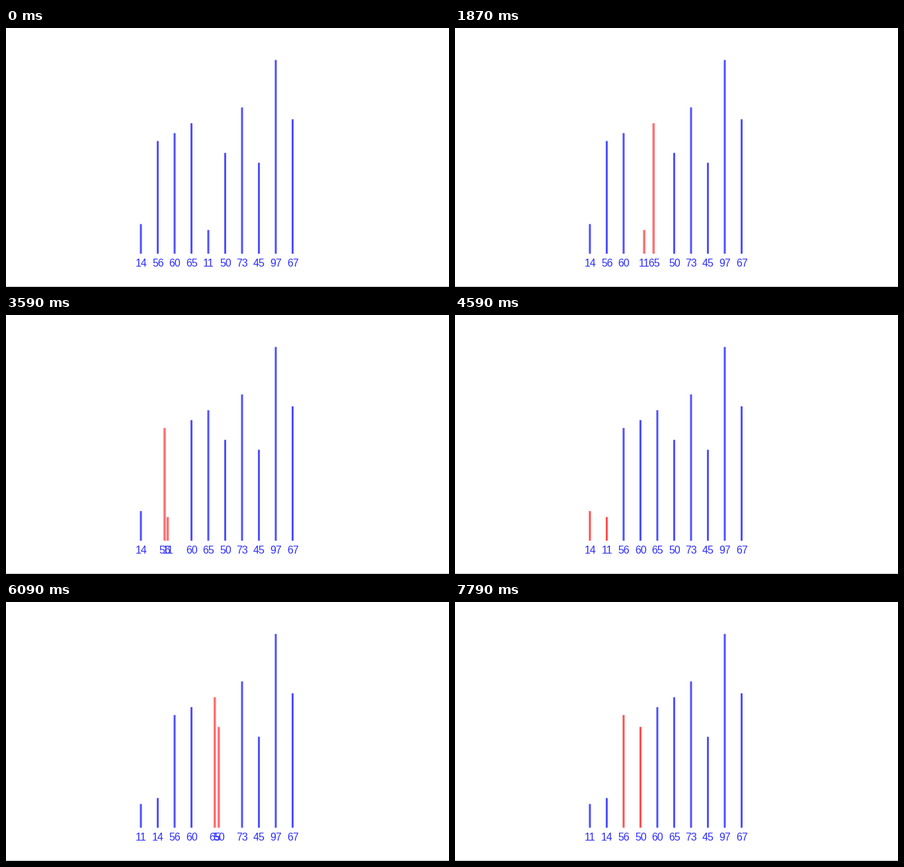
A matplotlib script for the animation above (8000 ms loop, 670 by 393 pixels).

```python
import math

import matplotlib.pyplot as plt
from matplotlib.animation import FuncAnimation
from matplotlib.patches import Rectangle

W, H, DPI = 670, 393, 100
LOOP, TICK = 8000, 20

VALUES = [14, 56, 60, 65, 11, 50, 73, 45, 97, 67]
BASE, UNIT = 341, 3
FIRST_X, GAP = 204, 25.5
STROKE = 3
BLUE, RED, MOVING, TEXT_BLUE = "#5050ff", "#ff5050", "#ff7070", "#2c2cff"

# Moments at which the sort moves on to its next comparison
MARKS = [150, 480, 930, 1250, 2020, 2800, 3900, 5220, 6550, 7790, 9030]
HOLD = 78


def comparisons(values):
    """Insertion sort: yield the bar order and left slot of each comparison."""
    order = list(range(len(values)))
    for i in range(1, len(order)):
        for j in range(i, 0, -1):
            yield order[:], j - 1
            a, b = order[j - 1], order[j]
            if values[a] <= values[b]:
                break
            order[j - 1], order[j] = b, a


STEPS = list(zip(MARKS, MARKS[1:], comparisons(VALUES)))


def swing(u):
    return 0.5 - 0.5 * math.cos(math.pi * min(max(u, 0), 1))


def state(t):
    """Return x of every bar, the compared pair and whether it is moving."""
    start, end, (order, slot) = [s for s in STEPS if s[0] <= t or s is STEPS[0]][-1]
    xs = {bar: FIRST_X + GAP * i for i, bar in enumerate(order)}
    if t < start:
        return xs, (), False
    a, b = pair = order[slot:slot + 2]
    span = end - start
    wait = 0.6 * span - 100
    moving = VALUES[a] > VALUES[b] and t - start >= wait
    if moving:
        held = wait + HOLD * ((t - start - wait) // HOLD)
        d = GAP * swing((held / span - 0.43) / 0.5)
        xs[a] += d
        xs[b] -= d
    return xs, pair, moving


fig = plt.figure(figsize=(W / DPI, H / DPI), dpi=DPI, facecolor="white")
ax = fig.add_axes([0, 0, 1, 1])
ax.set_xlim(0, W)
ax.set_ylim(H, 0)
ax.axis("off")

ax.add_patch(Rectangle((0, H - 1), W, 1, fc="#c0c0c0", lw=0))

bars, labels = [], []
for v in VALUES:
    bar = Rectangle((0, BASE - UNIT * v - STROKE / 2), STROKE,
                    UNIT * v + STROKE, lw=0, snap=False)
    bars.append(ax.add_patch(bar))
    labels.append(ax.text(0, 362, str(v), color=TEXT_BLUE, ha="center",
                          va="baseline", family="Liberation Sans",
                          size=16 * 72 / DPI))


def draw(n):
    xs, pair, moving = state(n * TICK + TICK / 2)
    for i, (bar, label) in enumerate(zip(bars, labels)):
        soft = moving and i in pair
        width = STROKE + 0.5 * soft
        bar.set_x(xs[i] - width / 2)
        bar.set_width(width)
        bar.set_facecolor(MOVING if soft else RED if i in pair else BLUE)
        label.set_x(xs[i] + 0.4)
    return bars + labels


anim = FuncAnimation(fig, draw, frames=LOOP // TICK, interval=TICK,
                     repeat=True, repeat_delay=0, blit=False)
plt.show()
```
